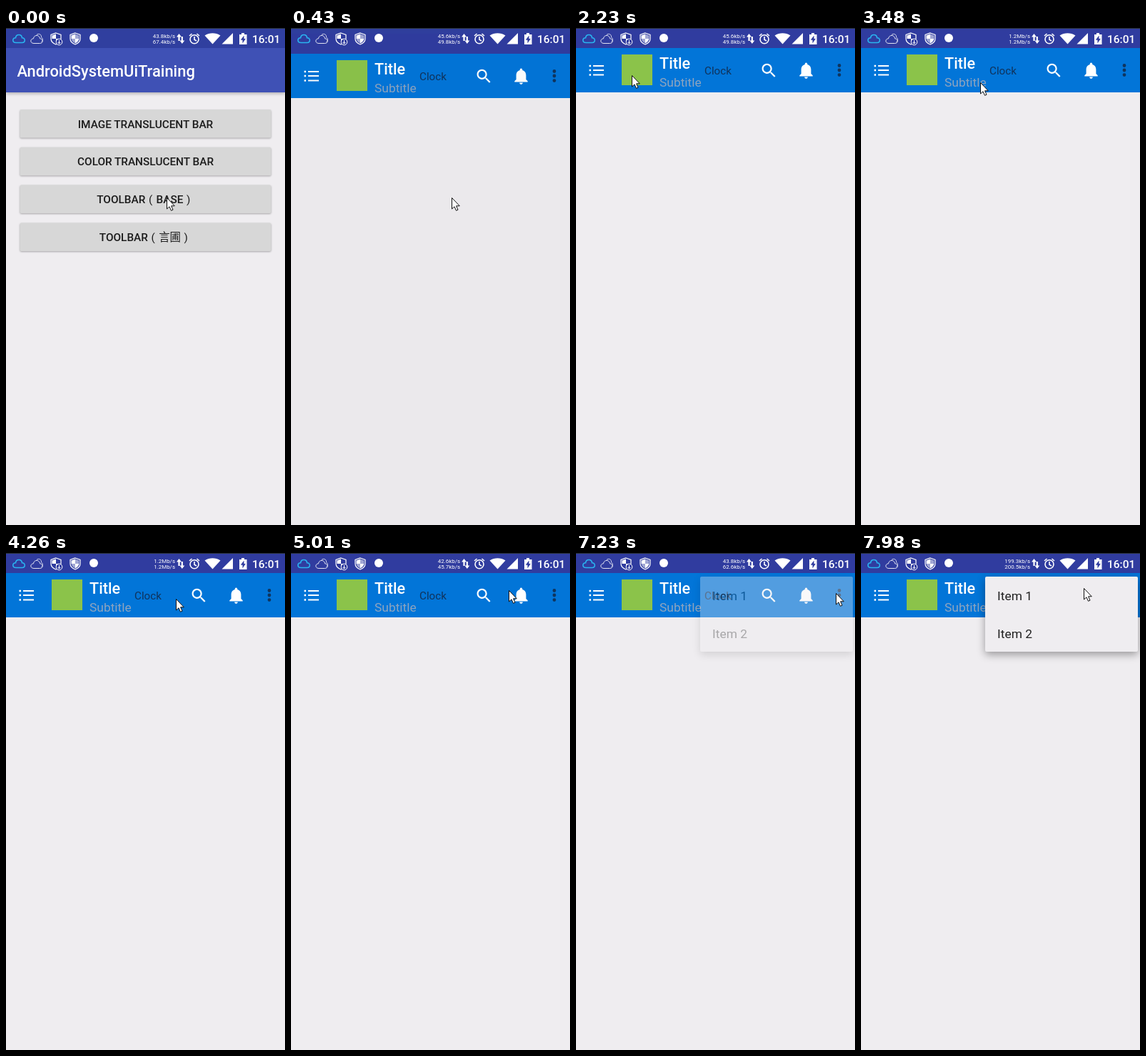
Write an HTML page that moves like this. It is 391 px wide and 695 px high and loops after 8 s.

```html
<!DOCTYPE html>
<html lang="en">
<head>
<meta charset="utf-8">
<title>Toolbar demo</title>
<style>
html, body { margin: 0; width: 100%; height: 100%; overflow: hidden; background: #efedf0; }
svg { display: block; width: 391px; height: 695px; font-family: Roboto, "Noto Sans CJK SC", "Noto Sans CJK", sans-serif; }
.bold { font-weight: 500; }
.bar { filter: drop-shadow(0 2px 2px rgba(0,0,0,.25)); }
.button rect { fill: #d7d7d7; filter: drop-shadow(0 1px 1px rgba(0,0,0,.3)); }
.button text { font-size: 15.35px; font-weight: 500; fill: #1c1c1c; text-anchor: middle; }
.button tspan { font-weight: 400; letter-spacing: .8px; }
.button.pressed rect { fill: #c6c6c6; }
#popup rect { fill: #efedf0; filter: drop-shadow(0 4px 6px rgba(0,0,0,.36)); }
#popup text { font-size: 17.4px; fill: #212121; }
#speed text { font-size: 7.95px; text-anchor: end; }
.line { fill: none; stroke: #fff; }
</style>
</head>
<body>
<svg viewBox="0 0 391 695">
  <defs>
    <path id="shield" d="M0-8 7-5.5V0C7 4 3.5 6.8 0 8-3.5 6.8-7 4-7 0V-5.5Z"/>
    <path id="cloud" d="M-4 5.5C-9.5 5.5-9.5-1-4.5-1.2-4-7 4-7 4.5-1.2 9.5-1 9.5 5.5 4.5 5.5Z"/>
  </defs>

  <!-- first screen -->
  <rect width="391" height="695" fill="#efedf0"/>
  <rect class="bar" y="28" width="391" height="62" fill="#3f51b5"/>
  <rect width="391" height="28" fill="#303f9f"/>
  <text class="bold" x="15.5" y="68" font-size="21.9" fill="#fff">AndroidSystemUiTraining</text>
  <g id="buttons"></g>

  <!-- second screen -->
  <g id="screen">
    <rect width="391" height="760" fill="#efedf0"/>
    <rect width="391" height="28" fill="#303c9f"/>
    <rect y="28" width="391" height="62" fill="#0275d8"/>
    <g fill="#fff">
      <path d="M24 52h15v2H24zm0 6h15v2H24zm0 6.5h15v2H24z"/>
      <path d="M18.5 51.8H21v2.5h-2.5zm0 6H21v2.5h-2.5zm0 6.4H21v2.5h-2.5z"/>
      <text class="bold" x="117" y="56.5" font-size="21.7">Title</text>
      <path transform="translate(257.3 46.5) scale(1.086)" d="M15.5 14h-.79l-.28-.27C15.41 12.59 16 11.11 16 9.5 16 5.91 13.09 3 9.5 3S3 5.91 3 9.5 5.91 16 9.5 16c1.61 0 3.09-.59 4.23-1.57l.27.28v.79l5 4.99L20.49 19l-4.99-5zm-6 0C7.01 14 5 11.99 5 9.5S7.01 5 9.5 5 14 7.01 14 9.5 11.99 14 9.5 14z"/>
      <path transform="translate(308.7 45.6) scale(1.15)" d="M12 22c1.1 0 2-.9 2-2h-4c0 1.1.89 2 2 2zm6-6v-5c0-3.07-1.64-5.64-4.5-6.32V4c0-.83-.67-1.5-1.5-1.5s-1.5.67-1.5 1.5v.68C7.63 5.36 6 7.92 6 11v5l-2 2v1h16v-1l-2-2z"/>
    </g>
    <rect x="64" y="37" width="43" height="43" fill="#8bc34a"/>
    <text x="117" y="81.5" font-size="17.4" fill="#8ea4bf">Subtitle</text>
    <text x="180" y="65" font-size="15.2" fill="#10335c">Clock</text>
    <path d="M369 52.5v0M369 59v0M369 65.6v0" stroke="#0f355f" stroke-width="4.8" stroke-linecap="round"/>
  </g>
  <rect id="dim" width="391" height="695"/>

  <!-- status icons -->
  <g fill="#fff">
    <use href="#cloud" class="line" x="18" y="15" style="stroke:#2ab4f0" stroke-width="1.6"/>
    <g class="line" opacity=".85">
      <use href="#cloud" x="43" y="16"/>
      <path d="M43 9.5c3-2.5 7-.5 6.5 3.500 2.500 1.500 2.500 5 0 7"/>
    </g>
    <g transform="translate(70 15)">
      <use href="#shield" class="line" stroke-width="1.2"/>
      <path d="M-5.5-4.5 0-6.5V0H-5.5ZM0 0H4L0 6Z"/>
      <circle cx="4.5" cy="4.5" r="4.3" fill="#303c9f" stroke="#fff"/>
      <path class="line" d="M4.5 2V7M2.5 5 4.5 7 6.5 5"/>
    </g>
    <g transform="translate(97 15)">
      <use href="#shield" class="line" stroke-width="1.2"/>
      <path d="M-5.5-4.5 0-6.5V0H-5.5ZM0 0H5.500C5 3 3 5 0 6.5Z"/>
      <path opacity=".55" d="M5.5-4.5 0-6.5V0H5.5ZM0 0H-5.5C-5 3-3 5 0 6.5Z"/>
    </g>
    <circle cx="123" cy="14" r="6"/>
    <g id="speed"><text x="237" y="13.7"></text><text x="237" y="22.3"></text></g>
    <path d="M242.500 8 246 12.5H243.6V18H241.4V12.5H239ZM246.8 22 243.5 17.5H245.7V12H247.9V17.5H250.3Z"/>
    <g class="line" stroke-width="1.6">
      <circle cx="264" cy="15.8" r="6"/>
      <path d="M264 12V16.2L267 18M257 11 260.5 8M271 11 267.5 8"/>
    </g>
    <path d="M289.5 22.5 278.5 10.5C285 6.3 294 6.3 300.5 10.5Z"/>
    <path d="M302.5 22.5 318 7V22.5Z"/>
    <path d="M327 9H330V7H334V9H337.5V23H327Z"/>
    <path d="M333.5 10.5 328.8 16.8H331.5V21.5L335.8 15H333.5Z" fill="#303c9f"/>
    <text class="bold" x="345" y="20.7" font-size="15.5">16:01</text>
  </g>
  <rect width="391" height="1" fill="#27302f"/>

  <g id="popup">
    <rect x="174" y="33" width="214" height="105" rx="2"/>
    <text x="191" y="65.5">Item 1</text>
    <text x="191" y="118.5">Item 2</text>
  </g>
  <path id="cursor" d="M.5.5V16L4 12.8 6.5 18.3 9 17.2 6.6 11.8H11.3Z" fill="#fff" stroke="#111"/>
</svg>
<script>
const $ = id => document.getElementById(id);
const clamp = v => Math.max(0, Math.min(1, v));
const smooth = k => k * k * (3 - 2 * k);

const LOOP = 8000;
// cursor stops: time, x, y
const stops = [[550, 225, 237], [1150, 48, 68], [1390, 29, 61], [3480, 167, 76],
  [5010, 305, 52], [6250, 364, 56], [7230, 364, 56], [7980, 312, 49]];
// network readout, refreshed every 1.4 s
const speeds = ["43.8kb/s 67.4kb/s", "45.6kb/s 49.8kb/s", "45.6kb/s 49.8kb/s", "1.2Mb/s 1.2Mb/s",
  "42.6kb/s 45.7kb/s", "43.8kb/s 62.6kb/s", "199.3kb/s 200.5kb/s"].map(s => s.split(" "));

const aside = s => `<tspan>&nbsp;(&nbsp;${s}<tspan>&nbsp;)&nbsp;</tspan></tspan>`;
const labels = ["IMAGE TRANSLUCENT BAR", "COLOR TRANSLUCENT BAR",
  "TOOLBAR" + aside('<tspan style="font-weight:500;letter-spacing:0">BASE</tspan>'),
  "TOOLBAR" + aside('<tspan style="letter-spacing:0">言圃</tspan>')];
$("buttons").innerHTML = labels.map((label, i) =>
  `<g class="button" transform="translate(0 ${114 + i * 52.8})">
    <rect x="19.5" width="352" height="39.5" rx="2"/><text x="195.5" y="25.7">${label}</text></g>`).join("");
const pressed = $("buttons").children[2];

function cursorAt(t) {
  let [x, y] = stops[0].slice(1);
  for (let i = 1; i < stops.length; i++) {
    const [t0, x0, y0] = stops[i - 1], [t1, x1, y1] = stops[i];
    const k = smooth(clamp((t - t0) / (t1 - t0)));
    x += (x1 - x0) * k;
    y += (y1 - y0) * k;
  }
  return [Math.round(x), Math.round(y)];
}

function draw(t) {
  const slide = clamp((t - 192) / 390);
  $("screen").setAttribute("transform", `translate(0 ${Math.round(55 * (1 - slide) ** 2)})`);
  $("screen").setAttribute("opacity", clamp(slide * 3));
  $("dim").setAttribute("opacity", slide > 0 ? .04 * (1 - slide) : 0);
  pressed.classList.toggle("pressed", t >= 150);
  $("popup").setAttribute("opacity", clamp((t - 7130) / 300));
  $("cursor").setAttribute("transform", `translate(${cursorAt(t)})`);
  const rates = speeds[Math.floor((t + 1130) / 1400)];
  [...$("speed").children].forEach((line, i) => line.textContent = rates[i]);
}

const start = performance.now();
function loop() {
  draw((performance.now() - start) % LOOP);
  requestAnimationFrame(loop);
}
loop();
</script>
</body>
</html>
```
